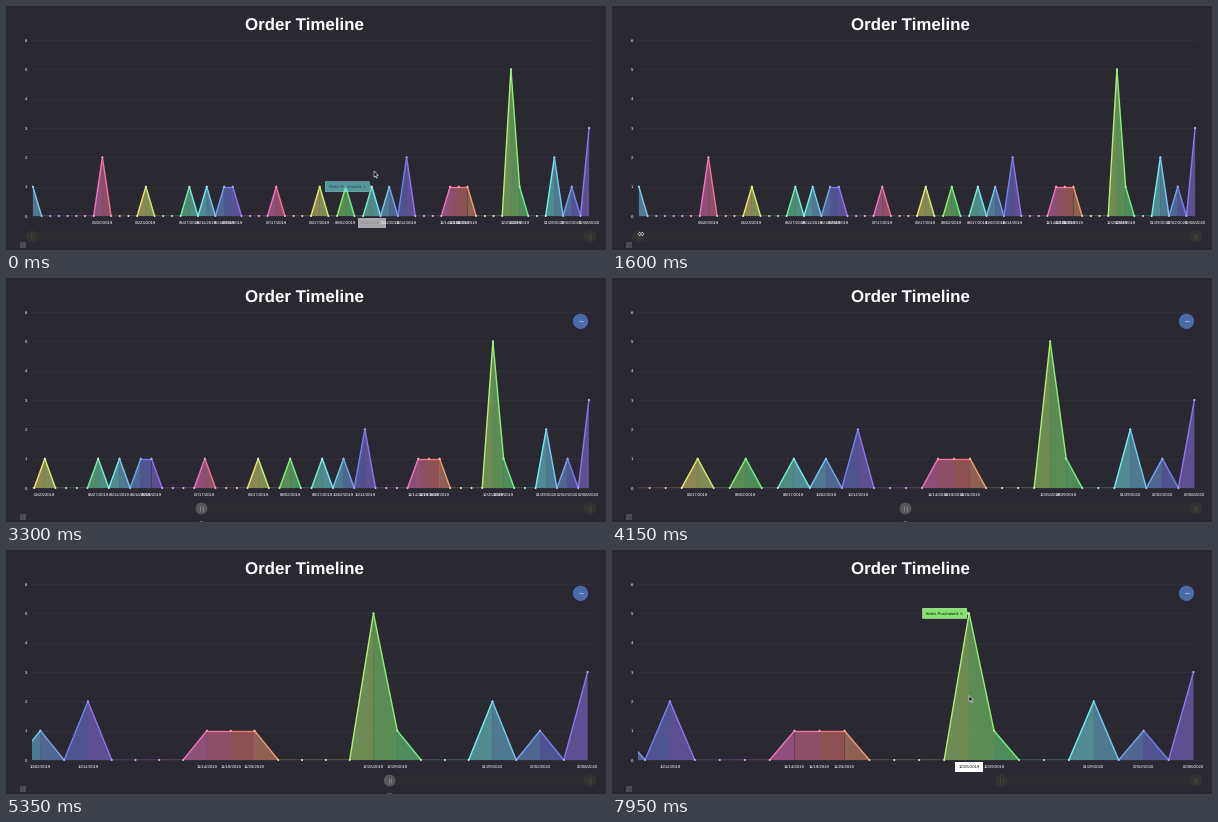
These frames come from a looping animation (600x244 px, 8000 ms). A matplotlib script:

```python
import colorsys

import matplotlib.pyplot as plt
import numpy as np
from matplotlib.animation import FuncAnimation
from matplotlib.collections import LineCollection, PolyCollection
from matplotlib.patches import Circle, Polygon, Rectangle

W, H, DPI = 600, 244, 100
STEP, LOOP = 50, 8000
LEFT, RIGHT, TOP, BASE, BAR = 26, 584, 34, 210, 230.5
UNIT = (BASE - TOP) / 6
LAST = 64
SPAN = LAST + 0.2
ZOOM = 0.6514       # final left edge of the zoomed range
ZOOM_START = 2880
BG, GRID, MUTED = "#2a2932", "#34333c", "#3a3934"

plt.rcParams["font.family"] = "Liberation Sans"
plt.rcParams["text.hinting"] = "no_hinting"

# categories with orders: mostly one item, a few peaks
HITS = [0, 8, 13, 18, 20, 22, 23, 28, 33, 36, 39, 41, 43, 48, 49, 50, 55, 56, 60, 62, 64]
PEAKS = {8: 2, 43: 2, 55: 5, 60: 2, 64: 3}
MONTH_DAYS = ("02-20 03-20 04-23 05-27 06-11 06-16 06-18 07-17 08-17 09-02 09-17 "
              "10-02 10-14 11-14 11-19 11-25 12-25 12-29 01-29 02-02 02-08").split()

IDX = np.arange(LAST + 1)
VALUES = np.isin(IDX, HITS).astype(int)
for i, v in PEAKS.items():
    VALUES[i] = v
YS = BASE - UNIT * VALUES
iso = [f"{2019 + (i > 56)}-{d}" for i, d in zip(HITS, MONTH_DAYS)]
days = np.interp(IDX, HITS, np.array(iso, "datetime64[D]").astype(int)).round().astype(int)
DATES = [f"{d[5:7]}/{d[8:]}/{d[:4]}" for d in days.astype("datetime64[D]").astype(str)]
COLORS = np.array([colorsys.hls_to_rgb((199 + 18 * i) % 360 / 360, 0.70, 0.80) for i in IDX])


def ramp(t, start, length):
    return min(max((t - start) / length, 0), 1)


def ease_out(t, start, length, power):
    return 1 - (1 - ramp(t, start, length)) ** power


def grip_x(t):
    return LEFT + (RIGHT - LEFT) * ZOOM * ease_out(t, 2120, 3450, 1.5)


def positions(t):
    visible = SPAN * (1 - ZOOM * ease_out(t, ZOOM_START, 3100, 2.3))
    return RIGHT - (LAST + 0.1 - IDX) * (RIGHT - LEFT) / visible


def mouse_at(t):
    """Rest on the chart, go to the grip, drag it, return to the highest peak."""
    drag = np.array([grip_x(t) + 3 * (1 - ramp(t, 2120, 800)), 228 + 17.5 * ramp(t, 2120, 1100)])
    pos = np.array([368, 165]) * (1 - ramp(t, 450, 950)) + drag * ramp(t, 450, 950)
    pos += (np.array([383, 203.5]) - pos) * ramp(t, 6000, 450)
    return pos + (np.array([357, 145.5]) - pos) * ramp(t, 6450, 800)


def px(size):
    return size * 72 / DPI


fig = plt.figure(figsize=(W / DPI, H / DPI), dpi=DPI, facecolor=BG)
ax = fig.add_axes([0, 0, 1, 1])
ax.set(xlim=(0, W), ylim=(H, 0))
ax.axis("off")


def text(x, y, s, size=4.3, color="white", z=6, **kw):
    return ax.text(x, y, s, fontsize=px(size), color=color, ha="center",
                   va="center_baseline", zorder=z, **kw)


def box(x, y, w, h, color, z):
    return ax.add_patch(Rectangle((x, y), w, h, fc=color, ec="none", zorder=z))


def clip(artist, x0, y0, x1, y1):
    artist.set_clip_path(Rectangle((x0, y0), x1 - x0, y1 - y0, transform=ax.transData))


class Grip:
    def __init__(self, x):
        self.disc = ax.add_patch(Circle((x, BAR), 5.5, lw=px(0.6), zorder=3))
        self.bars = LineCollection([], linewidths=px(0.8), zorder=4)
        ax.add_collection(self.bars)
        self.place(x, False)

    def place(self, x, held):
        self.disc.set_center((x, BAR))
        self.disc.set_facecolor("#57565a" if held else "#33322f")
        self.disc.set_edgecolor("#5e5d61" if held else MUTED)
        self.bars.set_segments([[(x + d, BAR - 2.2), (x + d, BAR + 2.2)] for d in (-1.1, 1.1)])
        self.bars.set_color("#8c8b90" if held else "#46453c")


# title, value axis, corner badge
text(298, 18, "Order Timeline", 16.9, weight="bold")
for v in range(7):
    y = BASE - UNIT * v
    ax.plot([LEFT, RIGHT], [y, y], color=GRID, lw=px(0.8), zorder=1)
    text(20, y, str(v))
box(14, 236, 6, 6, "#4c4b53", 2)

# series
areas = PolyCollection([], facecolors=COLORS[:-1], alpha=0.5, edgecolors="none", zorder=2)
lines = LineCollection([], colors=COLORS[:-1], linewidths=px(1.4), capstyle="round", zorder=3)
for coll in (areas, lines):
    ax.add_collection(coll)
    clip(coll, LEFT, TOP - 4, RIGHT, BASE)
dots = ax.scatter(IDX, YS, s=px(2) ** 2, c=COLORS * 0.6 + 0.4, linewidths=0, zorder=4)
clip(dots, LEFT - 1, TOP - 4, RIGHT + 1, BASE + 0.6)
labels = {i: text(0, 216.5, DATES[i]) for i in HITS[1:]}
for lab in labels.values():
    clip(lab, 15, 205, 590.5, 225)

# scrollbar
box(LEFT, BAR - 4.5, RIGHT - LEFT, 9, "#2c2b33", 1)
thumb = box(LEFT, BAR - 4.5, 1, 9, "#2e2d31", 2)
grip = Grip(LEFT)
Grip(RIGHT)

# zoom-out button
button = [ax.add_patch(Circle((574.5, 43.3), 7.6, fc="#4a6cab", ec="none", zorder=6)),
          ax.plot([572.5, 576.5], [43.3, 43.3], color="#a9bbdc", lw=px(0.8), zorder=7)[0]]

# tooltips
tip = ax.add_patch(Polygon([(0, 0), (1, 0), (1, 1)], lw=px(0.6), zorder=8))
tip_text = text(0, 0, "", 4.2, "#101010", 9)
date_box = box(0, 211.5, 28.5, 10, "white", 8)
date_text = text(0, 216.5, "", 4.3, "#101010", 9)
hover = (tip, tip_text, date_box, date_text)

# pointers
ARROW = np.array([(0, 0), (0, 6.2), (1.4, 5), (2.4, 7.2), (3.4, 6.7), (2.4, 4.6), (4.3, 4.5)])
HALF = np.array([(-2.9, 0), (-1, -2), (-1, -0.7), (1, -0.7), (1, -2)])
RESIZE = np.vstack([HALF, -HALF])
pointer = ax.add_patch(Polygon(ARROW, fc="#0c0c0c", ec="#e4e4e4", lw=px(0.6), zorder=12))


def draw_hover(t, xs):
    alpha = max(min(0.6 + t / 400, 1 - ramp(t, 1130, 200)), ramp(t, 6450, 200))
    for a in hover:
        a.set_visible(alpha > 0)
        a.set_alpha(alpha)
    i = int(np.argmin(abs(xs - mouse_at(t)[0])))
    x, y = xs[i], YS[i]
    side = -1 if x > (LEFT + RIGHT) / 2 else 1
    outline = [(0, 0), (2.5, -1.8), (2.5, -5), (46.5, -5), (46.5, 5), (2.5, 5), (2.5, 1.8)]
    tip.set_xy([(x + side * dx, y + dy) for dx, dy in outline])
    tip.set_facecolor(COLORS[i] * 0.95)
    tip.set_edgecolor(COLORS[i] * 0.5 + 0.5)
    tip_text.set_position((x + side * 24.5, y))
    tip_text.set_text(f"Items Purchased: {VALUES[i]}")
    date_box.set_x(x - 14.25)
    date_text.set_position((x, 216.5))
    date_text.set_text(DATES[i])


def update(frame):
    t = frame * STEP
    xs = positions(t)
    pts = np.column_stack([xs, YS])
    feet = np.column_stack([xs, np.full(LAST + 1, BASE)])
    areas.set_verts(np.stack([feet[:-1], pts[:-1], pts[1:], feet[1:]], axis=1))
    lines.set_segments(np.stack([pts[:-1], pts[1:]], axis=1))
    dots.set_offsets(pts)
    for i, lab in labels.items():
        lab.set_x(xs[i])
        lab.set_visible(xs[i] >= LEFT)

    gx = grip_x(t)
    grip.place(gx, 2000 <= t < 5950)
    thumb.set_bounds(gx, BAR - 4.5, RIGHT - gx, 9)
    for a in button:
        a.set_visible(t > ZOOM_START)

    draw_hover(t, xs)
    pointer.set_xy((RESIZE if 1350 <= t < 6050 else ARROW) + mouse_at(t))
    return []


anim = FuncAnimation(fig, update, frames=LOOP // STEP, interval=STEP,
                     init_func=lambda: update(0), repeat=True, repeat_delay=0)
plt.show()
```
